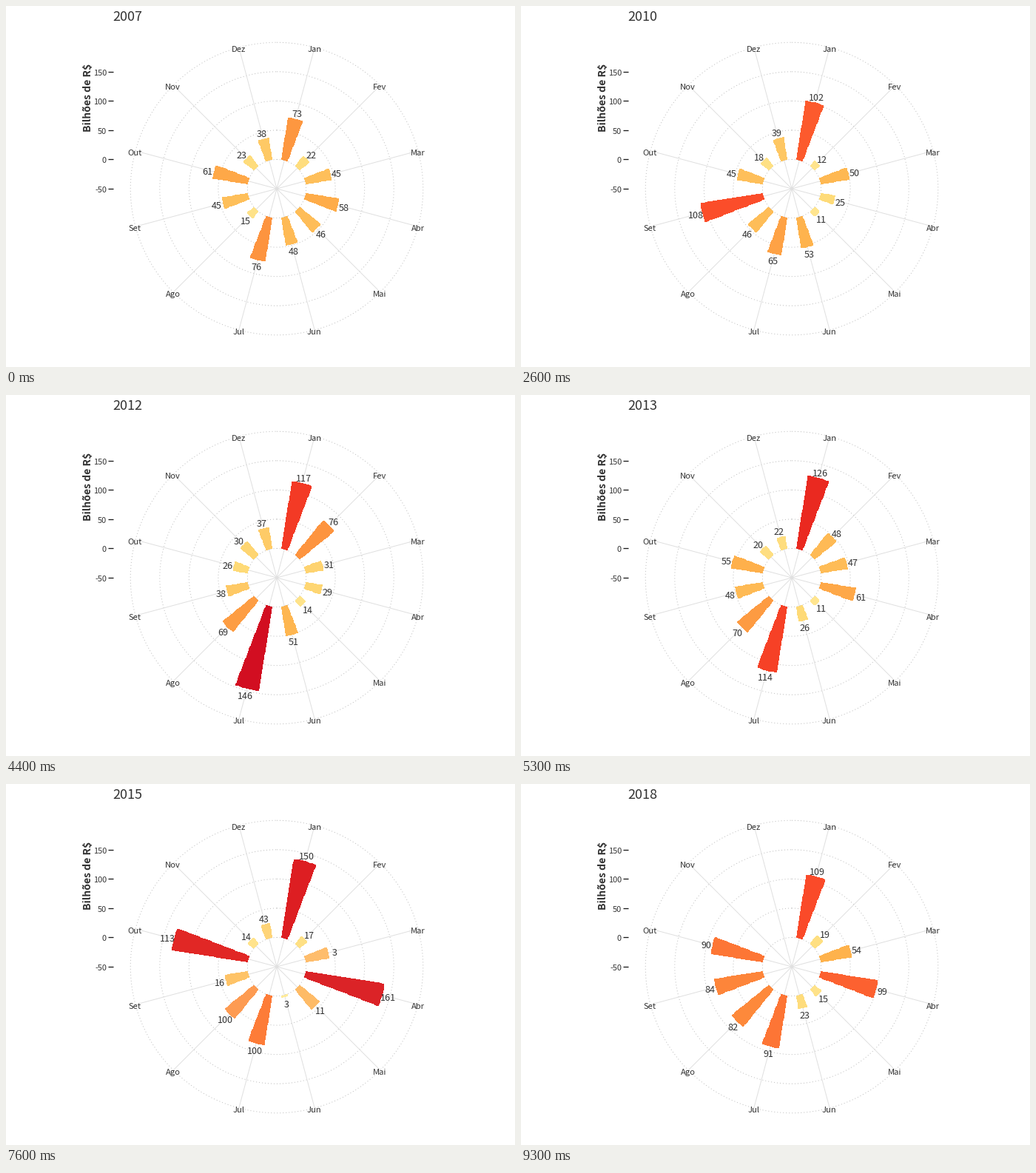
Recreate the animation shown at these times as a matplotlib script. Size 688 by 488 pixels, loop 10000 ms.

```python
import matplotlib.pyplot as plt
import numpy as np
from matplotlib.animation import FuncAnimation
from matplotlib.colors import LinearSegmentedColormap
from matplotlib.patches import Circle, Polygon

W, H, DPI = 688, 488, 100
CX, CY, SCALE = 366, 247, 0.791         # centre and pixels per billion
HOLE = 50                               # the axis starts at -50
HALF_BAR = np.radians(6)
INK = "#333333"
FONT = "Noto Sans CJK JP"
CAP = 0.733                             # digit height in ems
TAG_SIZE = 12.6

MONTHS = "Jan Fev Mar Abr Mai Jun Jul Ago Set Out Nov Dez".split()
FIRST, LAST = 2007, 2018
# Key years from January on; the years between are interpolated
KEY_YEARS = {
    2007: [73, 22, 45, 58, 46, 48, 76, 15, 45, 61, 23, 38],
    2009: [94, 10, 28, 39, 39, 34, 50, 26, 47, 51, 27, 42],
    2010: [102, 12, 50, 25, 11, 53, 65, 46, 108, 45, 18, 39],
    2012: [117, 76, 31, 29, 14, 51, 146, 69, 38, 26, 30, 37],
    2014: [135, 21, 63, 93, 8, 2, 83, 71, 58, 84, 10, 7],
    2015: [122, 17, 79, 111, 77, 4, 71, 28, 64, 150, 12, 8],
    2016: [150, 17, 3, 161, 11, 3, 100, 100, 16, 113, 14, 43],
    2018: [109, 19, 54, 99, 15, 23, 91, 82, 84, 90],
}
FRAMES, STEP_MS = 100, 100

HEAT = LinearSegmentedColormap.from_list("heat", [
    "#FFEDA0", "#FED976", "#FEB24C", "#FD8D3C", "#FC4E2A", "#E31A1C", "#BD0026"])

fig = plt.figure(figsize=(W / DPI, H / DPI), dpi=DPI, facecolor="white")
ax = fig.add_axes([0, 0, 1, 1])
ax.set_xlim(0, W)
ax.set_ylim(H, 0)
ax.axis("off")


def px(size):
    """Pixels to points."""
    return size * 72 / DPI


def start_frame(year):
    """Eight steps of rest plus one of change, a step shorter from 2013 on."""
    n = year - FIRST
    return max(0, 9 * n - 1 - max(0, n - 6))


def year_values(year):
    if year in KEY_YEARS:
        return KEY_YEARS[year]
    before = max(y for y in KEY_YEARS if y < year)
    after = min(y for y in KEY_YEARS if y > year)
    a, b = KEY_YEARS[before], KEY_YEARS[after]
    part = (year - before) / (after - before)
    return [round(u + (v - u) * part) for u, v in zip(a, b)] + a[len(b):]


def month_angle(i):
    return np.radians(15 + 30 * i)


def polar(angle, value):
    """Clockwise from the top, radius in data units."""
    r = (value + HOLE) * SCALE
    return CX + r * np.sin(angle), CY - r * np.cos(angle)


def label(x, y, text, size, **kw):
    """Text whose capitals are centred on y."""
    kw = {"ha": "center", "color": INK, "zorder": 5, **kw}
    return ax.text(x, y + size * CAP / 2, text, fontsize=px(size),
                   family=FONT, va="baseline", **kw)


def bar_points(angle, value):
    """Outline snapped to whole pixels, which gives the stepped edges."""
    sweep = np.linspace(angle - HALF_BAR, angle + HALF_BAR, 8)
    rise = np.linspace(0, value, max(2, int(value / 4)))
    sides = [polar(sweep, 0), polar(sweep[-1], rise),
             polar(sweep[::-1], value), polar(sweep[0], rise[::-1])]
    return np.round(np.vstack([np.column_stack(side) for side in sides]))


def heat(value):
    return np.array(HEAT(value / 161))


# Grid, month names and axis
for value in range(0, 201, 50):
    ax.add_patch(Circle((CX, CY), (value + HOLE) * SCALE, fill=False,
                        ec="#BDBDBD", lw=px(1), ls=(0, (1, 3)), zorder=1))
for i, month in enumerate(MONTHS):
    x, y = polar(month_angle(i), 200)
    ax.plot([CX, x], [CY, y], color="#E0E0E0", lw=px(1), zorder=1)
    label(x - 0.5, y + 1.6, month, 11.2)
for value in range(-50, 151, 50):
    y = CY - (value + HOLE) * SCALE
    ax.plot([138, 145], [y, y], color="#1A1A1A", lw=px(1.3),
            solid_capstyle="butt")
    label(136, y + 0.8, str(value), 11, ha="right")
ax.text(115.4, 123.7, "Bilhões de R$", fontsize=px(14), family=FONT,
        weight="bold", color=INK, rotation=90, rotation_mode="anchor",
        ha="center", va="baseline")
title = label(144.3, 13.8, "", 18.1, ha="left")

bars = [ax.add_patch(Polygon([(CX, CY)] * 3, lw=0, antialiased=False, zorder=3))
        for _ in MONTHS]
tags = [label(CX, CY, "", TAG_SIZE) for _ in MONTHS]


def update(frame):
    year = max(y for y in range(FIRST, LAST + 1) if frame >= start_frame(y))
    now = year_values(year)
    # One halfway step before each new year
    halfway = year < LAST and frame == start_frame(year + 1) - 1
    after = year_values(year + 1) if halfway else now
    title.set_text(str(year))
    for i, (bar, tag) in enumerate(zip(bars, tags)):
        visible = i < len(after)
        bar.set_visible(visible)
        tag.set_visible(visible)
        if not visible:
            continue
        value = (now[i] + after[i]) / 2
        angle = month_angle(i)
        bar.set_xy(bar_points(angle, value))
        bar.set_facecolor((heat(now[i]) + heat(after[i])) / 2)
        x, y = polar(angle, value + 11)
        tag.set_text(str(after[i]))
        tag.set_position((x, y + 1.1 + TAG_SIZE * CAP / 2))
    return [title, *bars, *tags]


anim = FuncAnimation(fig, update, frames=FRAMES, interval=STEP_MS,
                     repeat=True, repeat_delay=0, blit=False)
plt.show()
```
